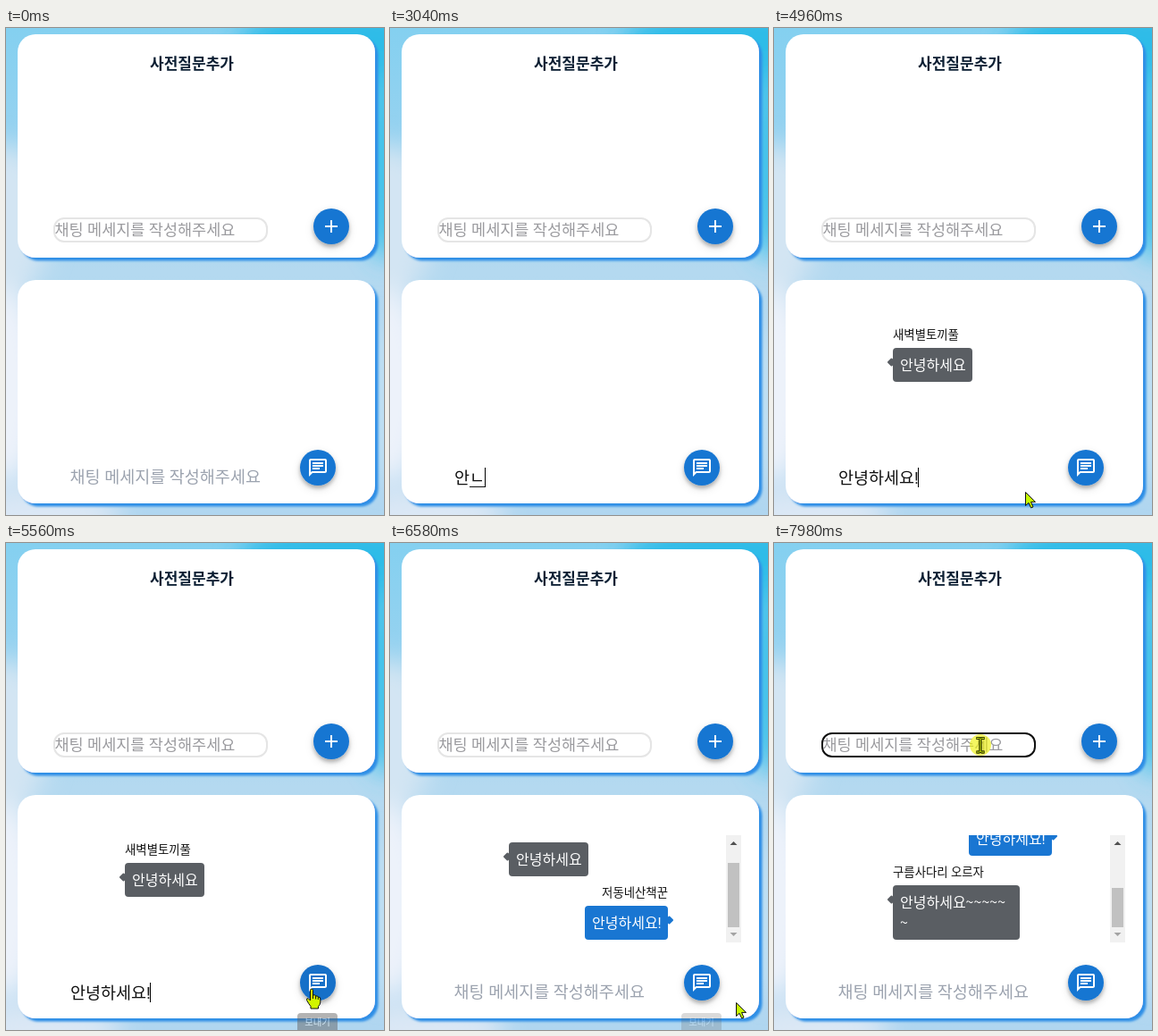
Write an HTML page that moves like this. It is 423 by 545 pixels and loops after 8000 ms.

```html
<!DOCTYPE html>
<html lang="ko">
<head>
<meta charset="utf-8">
<title>채팅</title>
<style>
  html, body { margin: 0; width: 100%; height: 100%; overflow: hidden; }
  svg { display: block; width: 100%; height: 100%; }
  text { font-family: Roboto, "Noto Sans CJK KR", "Noto Sans CJK", sans-serif; white-space: pre; }
  .cjk { font-family: "Noto Sans CJK KR", "Noto Sans CJK", sans-serif; }
  .name { font-size: 13.4px; fill: #111; }
  .msg { font-size: 16px; fill: #fff; }
  .field { font-size: 18.5px; }
</style>
</head>
<body>
<svg id="stage" viewBox="0 0 423 545" xmlns="http://www.w3.org/2000/svg">
  <defs>
    <linearGradient id="sky" x1="0" y1="0" x2="0" y2="1">
      <stop offset="0" stop-color="#84d0f0"/>
      <stop offset=".22" stop-color="#96d2f0"/>
      <stop offset=".5" stop-color="#b4d9f0"/>
      <stop offset="1" stop-color="#b0d6f0"/>
    </linearGradient>
    <filter id="soft" x="-50%" y="-50%" width="200%" height="200%"><feGaussianBlur stdDeviation="14"/></filter>
    <filter id="cardShadow" x="-5%" y="-5%" width="112%" height="115%">
      <feDropShadow dx="3.5" dy="3.5" stdDeviation="1.3" flood-color="#2f8fe6"/>
    </filter>
    <filter id="fabShadow" x="-60%" y="-60%" width="220%" height="240%">
      <feDropShadow dx="0" dy="3" stdDeviation="2.2" flood-color="#000" flood-opacity=".24"/>
      <feDropShadow dx="0" dy="3" stdDeviation="4.5" flood-color="#000" flood-opacity=".14"/>
    </filter>
    <clipPath id="chatClip"><rect x="13" y="327" width="363" height="120"/></clipPath>
  </defs>

  <rect width="423" height="545" fill="url(#sky)"/>
  <g filter="url(#soft)">
    <ellipse cx="385" cy="20" rx="125" ry="45" fill="#2dbce8"/>
    <ellipse cx="425" cy="150" rx="28" ry="110" fill="#45c2ea"/>
    <ellipse cx="0" cy="215" rx="50" ry="85" fill="#d3e5f3"/>
    <ellipse cx="0" cy="400" rx="42" ry="110" fill="#edf2fa"/>
    <ellipse cx="40" cy="545" rx="90" ry="30" fill="#dce8f5"/>
    <ellipse cx="425" cy="420" rx="22" ry="90" fill="#bfdff3"/>
  </g>

  <g fill="#fff" filter="url(#cardShadow)">
    <rect x="13" y="7" width="400" height="250" rx="20"/>
    <rect x="13" y="282" width="400" height="250" rx="20"/>
  </g>

  <text x="208" y="45.5" text-anchor="middle" font-size="17" font-weight="700" fill="#0c1f33">사전질문추가</text>
  <rect id="topField" x="54" y="213" width="238" height="26" rx="11" fill="#fff" stroke-width="2"/>
  <text x="54.5" y="232" font-size="17.5" fill="#9b9b9f">채팅 메세지를 작성해주세요</text>

  <g clip-path="url(#chatClip)"><g id="log"></g></g>
  <g id="bar">
    <rect x="376" y="327" width="17" height="120" fill="#f1f1f1"/>
    <rect id="thumb" x="378" width="13" fill="#c1c1c1"/>
    <path d="M380.5 338l4-4 4 4z" fill="#505050"/>
    <path d="M380.5 436l4 4 4-4z" fill="#a3a3a3"/>
  </g>

  <text id="hint" class="field" x="71.5" y="509" fill="#9ca3af">채팅 메세지를 작성해주세요</text>
  <text id="typed" class="field" x="72" y="510" fill="#111"></text>
  <rect id="underline" y="513" width="17" height="1" fill="#111"/>
  <rect id="caret" width="1" height="22" fill="#000"/>

  <g filter="url(#fabShadow)">
    <circle cx="364" cy="222" r="20" fill="#1976d2"/>
    <circle id="send" cx="349" cy="492" r="20"/>
  </g>
  <path transform="translate(352 210)" fill="#fff" d="M19 13h-6v6h-2v-6H5v-2h6V5h2v6h6z"/>
  <path transform="translate(337 480)" fill="#fff" d="M4 4h16v12H5.17L4 17.17V4m0-2c-1.1 0-2 .9-2 2v18l4-4h14c1.1 0 2-.9 2-2V4c0-1.1-.9-2-2-2zM6 12h8v2H6zM6 9h12v2H6zM6 6h12v2H6z"/>

  <g id="tip">
    <rect x="326" y="526" width="45" height="24" rx="4" fill="#616161" fill-opacity=".95"/>
    <text x="348.5" y="540" text-anchor="middle" font-size="10.4" font-weight="500" fill="#fff">보내기</text>
  </g>

  <circle id="glow" r="12" fill="#eef000" fill-opacity=".62"/>
  <g id="pointer" stroke-linejoin="round">
    <path id="arrow" fill="#c6fa00" stroke="#111" d="M.5 .5V15.5L4 12.3L6.6 18L9 17L6.5 11.4H11.5Z"/>
    <g id="beam" fill="none">
      <path id="beamLine" d="M-4.5 -7.5H-1.5L0 -6.5L1.5 -7.5H4.5M0 -6.5V7M-4.5 8H-1.5L0 7L1.5 8H4.5" stroke="#333800" stroke-width="3"/>
      <use href="#beamLine"/>
      <path d="M-4 -7.5H-1.5L0 -6.5L1.5 -7.5H4M0 -6.5V7M-4 8H-1.5L0 7L1.5 8H4" stroke="#c8e600"/>
    </g>
    <g id="hand" stroke="#111">
      <path fill="#d2f500" d="M-1.5 1.5Q-1.5 0 0 0T1.5 1.5V7Q4.3 6 4.6 8Q7 7.3 7.3 9.2Q9.8 8.8 9.8 11V15Q9.5 18 7.5 19.5V22H-1V19.5Q-3.5 16.5-5.5 12.5Q-5.8 10.3-3.8 10.7L-1.5 13Z"/>
      <path fill="none" d="M1.5 7V11M4.6 8V11.5M7.3 9.2V12"/>
    </g>
  </g>
</svg>

<script>
const LOOP = 8000;
const FIELD_X = 72, GLYPH = 17;
const SENT = 5660;

const el = id => document.getElementById(id);
const set = (id, attrs) => {
  for (const key in attrs) el(id).setAttribute(key, attrs[key]);
};
const show = (id, on) => set(id, { visibility: on ? "visible" : "hidden" });
const within = (t, a, b) => t >= a && t < b;
const ramp = (t, a, b) => Math.min(1, Math.max(0, (t - a) / (b - a)));
const latest = (list, t) => list.filter(item => item[0] <= t).pop();

// Messages, placed at scroll offset 0
const messages = [
  { at: 4140, name: "새벽별토끼풀", x: 133, y: 358, w: 89, lines: ["안녕하세요"] },
  { at: SENT, name: "저동네산책꾼", x: 218, y: 429, w: 93, lines: ["안녕하세요!"], mine: true },
  { at: 6980, name: "구름사다리 오르자", x: 133, y: 500, w: 142, lines: ["안녕하세요~~~~~", "~"] }
];
const scrolls = [[0, 0], [SENT, 23], [6980, 117]];

function bubble({ name, x, y, w, lines, mine }, i) {
  const fill = mine ? "#1976d2" : "#5a5e63";
  const edge = mine ? x + w : x;
  const tailX = mine ? edge + 1.5 : edge - 1.5;
  const rows = lines.map((line, n) =>
    `<text class="msg${lines.length > 1 ? " cjk" : ""}" x="${x + 8}" y="${y + 24.5 + n * 23}">${line}</text>`);
  return `<g id="msg${i}">
    <text class="name" x="${edge}" y="${y - 10.5}" text-anchor="${mine ? "end" : "start"}">${name}</text>
    <rect x="${tailX - 3.5}" y="${y + 12.5}" width="7" height="7" rx="1" fill="${fill}"
      transform="rotate(45 ${tailX} ${y + 16})"/>
    <rect x="${x}" y="${y}" width="${w}" height="${15 + lines.length * 23}" rx="4" fill="${fill}"/>
    ${rows.join("")}</g>`;
}
el("log").innerHTML = messages.map(bubble).join("");

const typing = [
  [0, ""], [2620, "ㅇ"], [2820, "안"], [3040, "안ㄴ"], [3240, "안녀"], [3440, "안녕"],
  [3540, "안녕ㅎ"], [3640, "안녕하"], [3840, "안녕하ㅅ"], [4040, "안녕하세"],
  [4560, "안녕하세요!"], [SENT, ""]
];
const caretOn = [[900, 1420], [1720, 2220], [2620, 5060], [5560, SENT]];
const clicks = [[800, 1000], [SENT, SENT + 100], [7980, LOOP]];

// Pointer legs: waypoints of time, x, y; sampled every 100 ms
const legs = [
  { end: 1120, path: [[400, 268, 522], [600, 177, 509]] },
  { end: 6380, path: [[4760, 205, 511], [4960, 281, 519], [5160, 391, 486], [5260, 352, 491], [5560, 342, 499]] },
  { end: LOOP, path: [[6380, 358, 508], [6580, 387, 514], [6680, 399, 500], [7180, 240, 242], [7480, 231, 226]] }
];

function pointerAt(t) {
  const leg = legs.find(({ path, end }) => within(t, path[0][0], end));
  if (!leg) return null;
  const start = leg.path[0][0];
  const s = start + Math.floor((t - start) / 100) * 100;
  const a = latest(leg.path, s);
  const b = leg.path[leg.path.indexOf(a) + 1] || a;
  const k = a === b ? 0 : (s - a[0]) / (b[0] - a[0]);
  const x = a[1] + (b[1] - a[1]) * k;
  const y = a[2] + (b[2] - a[2]) * k;
  return { x: Math.round(x), y: Math.round(y), kind: kindAt(x, y) };
}

function kindAt(x, y) {
  if (Math.hypot(x - 349, y - 492) < 20) return "hand";
  const inTop = within(x, 53, 293) && within(y, 212, 240);
  const inBottom = within(x, FIELD_X, 290) && within(y, 490, 516);
  return inTop || inBottom ? "beam" : "arrow";
}

function drawField(t) {
  const text = latest(typing, t)[1];
  const composing = text && !text.endsWith("!");
  const width = text.endsWith("!") ? 89 : text.length * GLYPH;
  el("typed").textContent = text;
  show("hint", !text);
  show("underline", composing);
  set("underline", { x: FIELD_X + width - GLYPH });
  set("caret", { x: FIELD_X + width, y: text ? 492 : 491 });
  show("caret", caretOn.some(([a, b]) => within(t, a, b)));
}

function drawLog(t) {
  const scroll = latest(scrolls, t)[1];
  const thumb = 86 * 120 / (120 + scroll);
  messages.forEach((m, i) => show("msg" + i, t >= m.at));
  set("log", { transform: `translate(0 ${-scroll})` });
  show("bar", scroll > 0);
  set("thumb", { y: Math.round(430 - thumb), height: Math.round(thumb) });
}

function drawPointer(t) {
  const p = pointerAt(t);
  for (const kind of ["arrow", "beam", "hand"]) show(kind, p && p.kind === kind);
  show("glow", p && clicks.some(([a, b]) => within(t, a, b)));
  set("send", { fill: p && p.kind === "hand" ? "#176fc8" : "#1976d2" });
  if (!p) return;
  set("pointer", { transform: `translate(${p.x} ${p.y})` });
  set("glow", { cx: p.x, cy: p.y });
}

function draw(t) {
  drawField(t);
  drawLog(t);
  drawPointer(t);
  set("tip", { opacity: ramp(t, 5460, 5660) * (1 - ramp(t, 6460, 6620)) });
  set("topField", { stroke: t >= 7980 ? "#101010" : "#e5e5e5" });
}

const began = performance.now();
function tick() {
  draw((performance.now() - began) % LOOP);
  requestAnimationFrame(tick);
}
tick();
</script>
</body>
</html>
```
